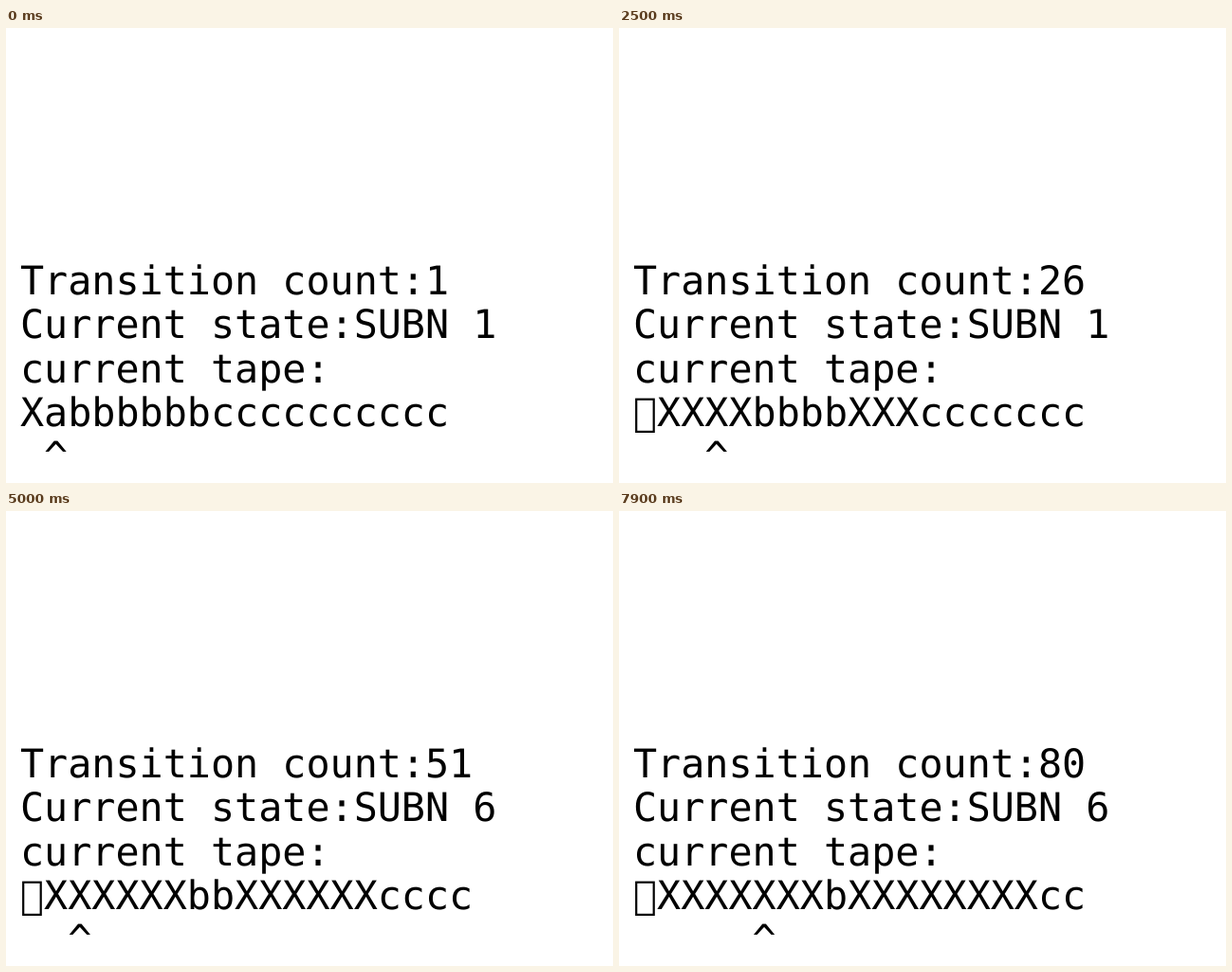
Animation, 640 px wide and 480 px high, one loop 8 s. Source, as an HTML page:

```html
<!DOCTYPE html>
<html lang="en">
<head>
<meta charset="utf-8">
<title>Tape machine</title>
<style>
  html, body { margin: 0; width: 100%; height: 100%; overflow: hidden; background: #fff; }
  svg { display: block; width: 640px; height: 480px; }
  text {
    font: 41.73px "DejaVu Sans Mono", monospace;
    text-rendering: geometricPrecision;
    white-space: pre;
  }
  #blank { fill: none; stroke: #000; stroke-width: 2.2; }
</style>
</head>
<body>
<svg viewBox="0 0 640 480">
  <text id="count" x="15" y="281"></text>
  <text id="state" x="15" y="327"></text>
  <text x="15" y="374">current tape:</text>
  <text id="tape" x="15" y="420"></text>
  <text id="head" x="15" y="466"></text>
  <rect id="blank" x="18.2" y="391.7" width="18.5" height="34.2"/>
</svg>
<script>
const STEP = 100, STEPS = 80;
const BLANK = "_", SPACE = "\u00a0";

// state: { symbol: [write, move, next state] }
const right = (symbols, state) =>
  Object.fromEntries([...symbols].map(s => [s, [s, 1, state]]));
const left = (symbols, state) =>
  Object.fromEntries([...symbols].map(s => [s, [s, -1, state]]));

const RULES = {
  "SUBN 0": { ...right("X", "SUBN 0"), a: ["X", 1, "SUBN 1"], b: ["X", 1, "SUBM 1"] },
  "SUBN 1": { ...right("aX", "SUBN 1"), b: ["X", 1, "SUBN 2"] },
  "SUBN 2": { b: ["X", 1, "SUBN 3"] },
  "SUBN 3": { ...right("bX", "SUBN 3"), c: ["X", 1, "SUBN 4"] },
  "SUBN 4": { c: ["X", 1, "SUBN 5"] },
  "SUBN 5": { c: ["X", 1, "SUBN 6"] },
  "SUBN 6": { ...left("abcX", "SUBN 6"), ...right(BLANK, "SUBN 0") },
  "SUBM 1": { ...right("bX", "SUBM 1"), c: ["X", 1, "SUBM 2"] },
  "SUBM 2": { c: ["X", -1, "SUBN 6"] }
};

function run() {
  const tape = [..."aa" + "b".repeat(6) + "c".repeat(10)];
  const log = [];
  let state = "SUBN 0", head = 0;
  for (let count = 1; count <= STEPS; count++) {
    const [write, move, next] = RULES[state][tape[head]];
    tape[head] = write;
    head += move;
    state = next;
    if (head < 0) {
      tape.unshift(BLANK);
      head = 0;
    }
    log.push({ count, state, head, tape: tape.join("") });
  }
  return log;
}

const log = run();
const el = id => document.getElementById(id);
const [count, state, tape, head, blank] =
  ["count", "state", "tape", "head", "blank"].map(el);
let shown = -1;

function show(i) {
  if (i === shown) return;
  shown = i;
  const s = log[i];
  count.textContent = "Transition count:" + s.count;
  state.textContent = "Current state:" + s.state;
  tape.textContent = s.tape.replace(BLANK, SPACE);
  head.textContent = SPACE.repeat(s.head) + "^";
  blank.style.display = s.tape[0] === BLANK ? "" : "none";
}

const start = performance.now();
function frame() {
  show(Math.floor((performance.now() - start) / STEP) % STEPS);
  requestAnimationFrame(frame);
}
show(0);
requestAnimationFrame(frame);
</script>
</body>
</html>
```
